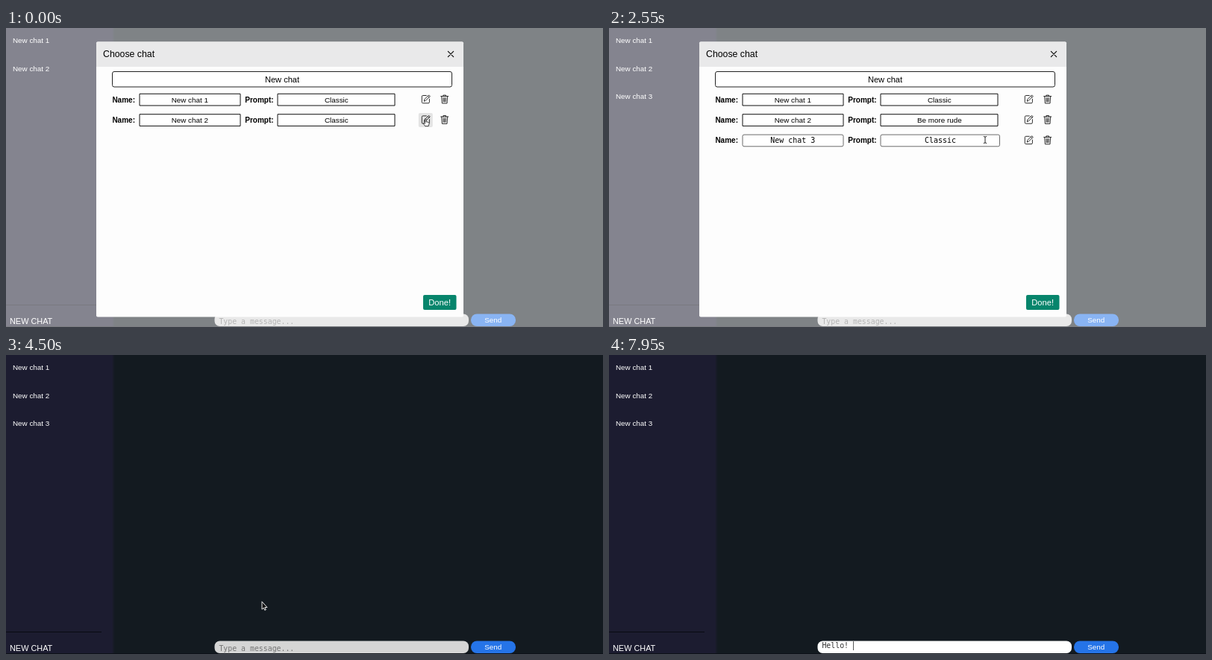
These frames come from a looping animation (800 px wide and 401 px high, 8 s). An HTML page with a canvas:

```html
<!DOCTYPE html>
<html lang="en">
<head>
<meta charset="utf-8">
<title>Chat prompts</title>
<style>
html, body { margin: 0; width: 100%; height: 100%; overflow: hidden; background: #131a20; }
canvas { display: block; width: 100vw; height: 100vh; }
</style>
</head>
<body>
<canvas id="stage" width="800" height="401"></canvas>
<script>
const ctx = document.getElementById('stage').getContext('2d');
const LOOP = 8000;
const SANS = '"Liberation Sans", Arial, sans-serif';
const MONO = '"DejaVu Sans Mono", monospace';

// Moments at which the interface changes, in ms
const AT = {
  editSecond: 150, select: 650, type: 780, saveSecond: 1980,
  addThird: 2210, editThird: 2400, selectThird: 2620, typeThird: 2750, saveThird: 3460,
  close: 3600, focus: 4620, hello: 4750, send: 5250, reply: 5400, stream: 5680,
  openSecond: 6970, refocus: 7240, retype: 7250
};

// Pointer path: time, x, y
const path = [
  [0, 562, 122], [170, 562, 122], [550, 480, 123], [1780, 480, 123],
  [1940, 562, 123], [2010, 562, 123], [2170, 400, 69], [2230, 400, 69],
  [2370, 562, 150], [2420, 562, 150], [2550, 504, 150], [3300, 504, 150],
  [3420, 562, 150], [3480, 562, 150], [3580, 580, 366], [3850, 579, 365],
  [4130, 45, 18], [4210, 45, 18], [4600, 400, 391], [5250, 400, 391],
  [5650, 330, 224], [6700, 330, 224], [6940, 44, 56], [7000, 44, 56],
  [7050, 44, 67], [7230, 330, 391], [LOOP, 330, 391]
];
const hiddenWhileTyping = [[800, 1780], [2770, 3300], [4770, 5260], [7260, LOOP]];

const between = (t, a, b) => t >= a && t < b;
const inside = (p, x, y, w, h) => between(p.x, x, x + w) && between(p.y, y, y + h);
const typed = (text, t, start, step) =>
  text.slice(0, Math.max(0, Math.floor((t - start) / step)));
const blink = (t, start) => (t - start) % 1000 < 500;
const rowY = i => 96 + 27.4 * i;

function pointerAt(t) {
  const i = path.findIndex(key => key[0] > t);
  const [t0, x0, y0] = path[i - 1], [t1, x1, y1] = path[i];
  const u = (t - t0) / (t1 - t0), k = u * u * (3 - 2 * u);
  return { x: x0 + (x1 - x0) * k, y: y0 + (y1 - y0) * k };
}

function rect(x, y, w, h, fill, radius = 0, stroke) {
  ctx.beginPath();
  ctx.roundRect(x, y, w, h, radius);
  if (fill) { ctx.fillStyle = fill; ctx.fill(); }
  if (stroke) { ctx.strokeStyle = stroke; ctx.lineWidth = 1; ctx.stroke(); }
}

function text(str, x, y, size, color, align = 'left', family = SANS, weight = '') {
  ctx.font = `${weight} ${size}px ${family}`;
  ctx.textAlign = align;
  ctx.fillStyle = color;
  ctx.fillText(str, x, y);
  return ctx.measureText(str).width;
}

function shape(d, x, y, stroke, fill, width = 1) {
  const p = new Path2D(d);
  ctx.save();
  ctx.translate(x, y);
  ctx.lineJoin = ctx.lineCap = 'round';
  if (fill) { ctx.fillStyle = fill; ctx.fill(p); }
  if (stroke) { ctx.strokeStyle = stroke; ctx.lineWidth = width; ctx.stroke(p); }
  ctx.restore();
}

const PENCIL = 'M7 1.3H2.4Q1 1.3 1 2.7V10.2Q1 11.6 2.4 11.6H9.7Q11.1 11.6 11.1 10.2V6' +
  'M4 8.7L4.6 6.4L10.3.7L11.9 2.3L6.2 8ZM9 2L10.6 3.6';
const TRASH = 'M1 2.4H11M4.2 2.4V.9H7.8V2.4M2 2.4L2.7 11.8H9.3L10 2.4' +
  'M4.3 4.5L4.5 9.7M6 4.5V9.7M7.7 4.5L7.5 9.7';
const ARROW = 'M0 0V10L2.3 8L3.8 11.2L5.3 10.5L3.9 7.4H6.6Z';
const HAND = 'M-.9.6Q-.9-.4 0-.4T.9.6V4L2.2 3.9L3.4 4.4L4.7 4.8Q5.2 5.2 5 6.5L4.2 9.6H-.4' +
  'L-2.6 6.3Q-2.9 5.3-2 5.2L-.9 6Z';
const BEAM = 'M-1.7-4.5Q0-4.5 0-3.6Q0-4.5 1.7-4.5M0-3.6V3.6M-1.7 4.5Q0 4.5 0 3.6Q0 4.5 1.7 4.5';

const chatCount = t => t >= AT.addThird ? 3 : 2;

function drawSidebar(t, p) {
  rect(0, 0, 143, 401, '#1c1c30');
  rect(143, 0, 2, 401, '#171b27');
  for (let i = 0; i < chatCount(t); i++) {
    const y = 3.4 + 37.5 * i;
    if (t > AT.close && inside(p, 0, y, 132, 27)) {
      rect(0, y, 132.5, 26.6, 'rgba(255,255,255,.24)', [0, 4, 4, 0]);
    }
    text(`New chat ${i + 1}`, 9, y + 16.8, 9.85, '#fff');
  }
  rect(0, 371, 128, 1, '#090a12');
  text('NEW CHAT', 5, 396.7, 10.9, '#fff');
}

function drawComposer(t) {
  const focusStart = t >= AT.refocus ? AT.refocus : AT.focus;
  const focused = between(t, AT.focus, AT.openSecond) || t >= AT.refocus;
  let message = '';
  if (t < AT.send) message = typed('Hello!', t, AT.hello, 70);
  else if (t >= AT.retype) {
    message = typed('Hello', t, AT.retype, 50) + typed('! ', t, AT.retype + 250, 110);
  }
  ctx.save();
  rect(279.5, 383.5, 340.5, 16.5, focused ? '#fff' : '#d5d5d5', 7);
  ctx.clip();
  const baseline = t < AT.focus ? 397.3 : 393.4;
  const width = text(message || 'Type a message...', 285.4, baseline, 9.87,
    message ? '#333' : '#757575', 'left', MONO);
  const caretOn = between(t, AT.send, AT.openSecond)
    ? between(t, AT.send, 5600) || between(t, 6200, 6300)
    : blink(t, focusStart) || t > 7850;
  if (focused && caretOn) rect(285.5 + (message ? width : 0), 384, 1, 12, '#555');
  ctx.restore();
  rect(623, 383.5, 60, 16.5, '#2574e8', 8);
  text('Send', 652.7, 395, 9.85, '#fff', 'center');
}

function drawAvatar(x, y) {
  rect(x - 18.5, y - 18.5, 37, 37, '#b07a43', 18.5);
  for (const side of [-1, 1]) {
    const eye = x + side * 6.6;
    rect(eye - 4, y - 10.7, 8, 8, '#fff');
    rect(eye - 1.5, y - 8.2, 3.2, 3.2, '#5b4a5c');
  }
  rect(x - 3.8, y + 4.5, 2.6, 2.6, '#d6525f');
  rect(x + 1.2, y + 4.5, 2.6, 2.6, '#d6525f');
  rect(x - 1.3, y + 6.7, 2.6, 2.2, '#d6525f');
}

function drawMessages(t) {
  if (!between(t, AT.send, AT.openSecond)) return;
  rect(750, 4, 50, 37.2, '#732046', 18.5);
  text('Hello!', 775, 26, 9.9, '#fff', 'center');
  if (t < AT.reply) return;
  drawAvatar(171, 74.7);
  const reply = typed('Hello! How can I assist you today?', t, AT.stream, 10);
  ctx.font = `9.9px ${SANS}`;
  rect(192.7, 56, 24.4 + ctx.measureText(reply).width, 37, '#3d404e', 12.2);
  text(reply, 205, 78.3, 9.9, '#fff');
}

function drawField(x, width, center, y, value, edit) {
  const w = edit && x > 300 ? width + 2.5 : width;
  rect(x + .5, y - 7.7, w, 15.7, '#fff', edit ? 2 : 0, edit ? '#6b6b6b' : '#111');
  const size = edit ? 9.97 : 9.85;
  const family = edit ? MONO : SANS;
  ctx.font = `${size}px ${family}`;
  const textWidth = ctx.measureText(value).width;
  if (edit && edit.selected) {
    rect(center - textWidth / 2, y - 6, textWidth, 12, '#b3d7ff');
  }
  text(value, center, y + 3.5, size, '#000', 'center', family);
  if (edit && edit.caret) rect(Math.round(center + textWidth / 2), y - 6, 1, 12, '#111');
}

// Prompt text and editing state of one row
function promptOf(i, t) {
  if (i === 0) return { value: 'Classic' };
  const [open, select, type, save, step, prompt] = i === 1
    ? [AT.editSecond, AT.select, AT.type, AT.saveSecond, 82, 'Be more rude']
    : [AT.editThird, AT.selectThird, AT.typeThird, AT.saveThird, 38, 'Be more polite'];
  const entry = typed(prompt, t, type, step);
  return {
    value: entry || 'Classic',
    edit: between(t, open, save) && {
      selected: t >= select && !entry,
      caret: entry.length > 0
    }
  };
}

function drawRow(i, t, p) {
  const y = rowY(i);
  const { value, edit } = promptOf(i, t);
  text('Name:', 142.4, y + 3.6, 10, '#000', 'left', SANS, 'bold');
  drawField(178.5, 135, 246.3, y, `New chat ${i + 1}`, edit && {});
  text('Prompt:', 320.3, y + 3.6, 10, '#000', 'left', SANS, 'bold');
  drawField(363.5, 157, edit ? 444 : 442.8, y, value, edit);
  for (const [x, icon] of [[562.3, PENCIL], [587.7, TRASH]]) {
    if (inside(p, x - 9.5, y - 9.5, 19, 19)) rect(x - 9.5, y - 9.5, 19, 19, '#e4e4e4', 2);
    shape(icon, x - 6, y - 6.8, '#222', null, .95);
  }
}

function drawDialog(t, p) {
  const alpha = 1 - Math.max(0, (t - AT.close) / 200);
  if (alpha <= 0) return;
  ctx.globalAlpha = alpha;
  rect(0, 0, 800, 401, 'rgba(255,255,255,.46)');
  rect(121, 18.5, 492, 369, '#fdfdfd', 2);
  rect(121, 18.5, 492, 33.5, '#e9e9ea', [2, 2, 0, 0]);
  text('Choose chat', 130, 39.3, 12.3, '#000');
  shape('M-3.6-3.6L3.6 3.6M3.6-3.6L-3.6 3.6', 596, 35, '#111', null, 1.3);
  rect(142.5, 58.5, 455, 20.5, '#fff', 2.5, '#222');
  text('New chat', 370, 72.7, 11.1, '#000', 'center');
  for (let i = 0; i < chatCount(t); i++) drawRow(i, t, p);
  rect(559, 358, 44.5, 20, '#07856c', 2);
  text('Done!', 581.2, 372, 11.2, '#fff', 'center');
  ctx.globalAlpha = 1;
}

function drawPointer(t, p) {
  if (hiddenWhileTyping.some(([a, b]) => between(t, a, b))) return;
  const dialogOpen = t < AT.close;
  const hand = dialogOpen
    ? inside(p, 552, 86, 46, 75) || inside(p, 142, 58, 456, 21) || inside(p, 559, 358, 45, 20)
    : [0, 1, 2].some(i => inside(p, 0, 3.4 + 37.5 * i, 132, 27));
  const beam = dialogOpen
    ? inside(p, 364, 115, 160, 17) || inside(p, 364, 142, 160, 17)
    : inside(p, 280, 383, 340, 17);
  if (hand) shape(HAND, p.x, p.y, '#111', '#fff', .8);
  else if (beam) shape(BEAM, p.x, p.y, '#222');
  else shape(ARROW, p.x, p.y, '#fff', '#111', .9);
}

function draw(now) {
  const t = now % LOOP;
  const p = pointerAt(t);
  rect(0, 0, 800, 401, '#131a20');
  drawSidebar(t, p);
  drawMessages(t);
  drawComposer(t);
  rect(0, 400, 800, 1, '#0d1118');
  drawDialog(t, p);
  drawPointer(t, p);
}

const start = performance.now();
function tick() {
  draw(performance.now() - start);
  requestAnimationFrame(tick);
}
tick();
</script>
</body>
</html>
```
